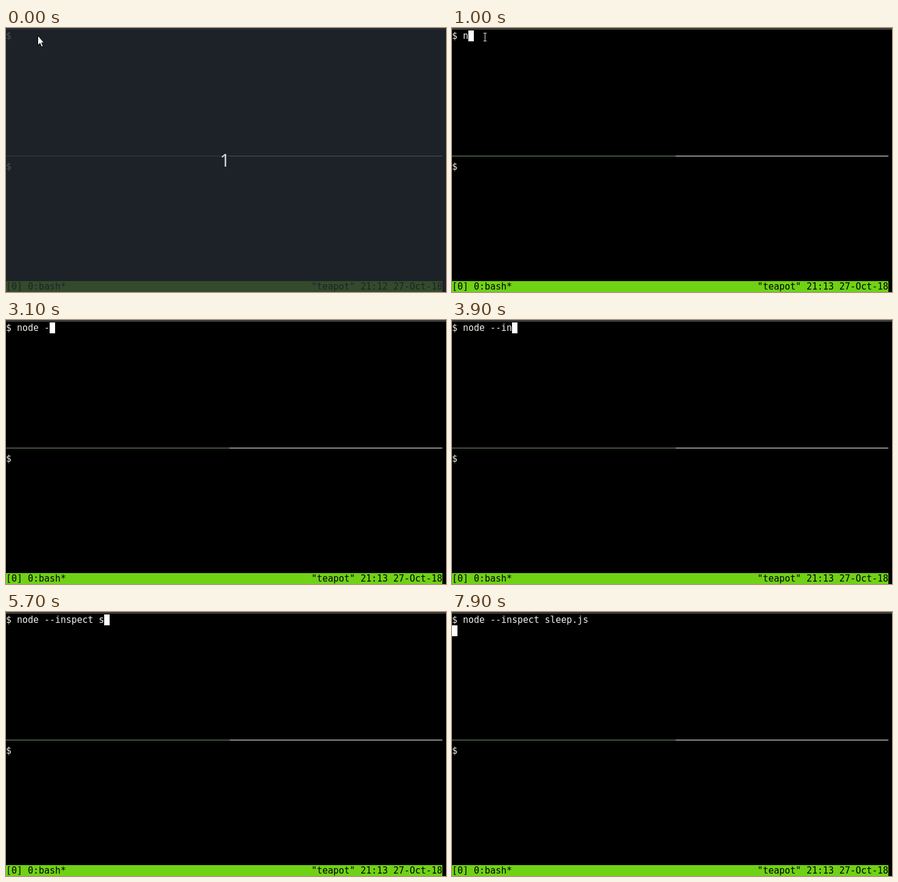
An HTML page that plays this animation: 726 by 436 pixels, repeating every 8 s.

```html
<!DOCTYPE html>
<html lang="en">
<head>
<meta charset="utf-8">
<title>Terminal session</title>
<style>
  html, body { margin: 0; width: 100%; height: 100%; overflow: hidden; background: #000; }
  #stage { position: relative; width: 726px; height: 436px; overflow: hidden; background: #000; }
  #stage > * { position: absolute; }
  .row {
    left: 0; height: 18px; white-space: pre; color: #eeeeec;
    font: 15px/18px "DejaVu Sans Mono", monospace; letter-spacing: -0.031px;
    font-variant-ligatures: none;
  }
  #top { left: 0; top: 0; width: 726px; height: 3px; background: #3c3b37; }
  .rule { top: 211px; height: 1px; }
  #bar { left: 0; top: 418px; width: 720px; height: 18px; background: #70d214; }
  .status { top: 418px; color: #000; }
  #caret { width: 9px; height: 18px; background: #fff; }
  #shade { inset: 0; background: rgba(37, 42, 50, .8); }
  #count {
    left: 353px; top: 197px; color: #d3d5d6;
    font: 29px/42px "Noto Sans", "Open Sans", sans-serif;
  }
</style>
</head>
<body>
<div id="stage">
  <div id="top"></div>
  <div class="row" id="prompt" style="top:4px">$ </div>
  <div id="caret"></div>
  <div class="rule" style="left:0;width:369px;background:#7a9a72"></div>
  <div class="rule" style="left:369px;width:351px;background:#fff"></div>
  <div class="row" style="top:220px">$ </div>
  <div id="bar"></div>
  <div class="row status">[0] 0:bash*</div>
  <div class="row status" id="clock" style="left:504px"></div>
  <svg id="beam" style="left:51px;top:8px" width="8" height="14" fill="none" stroke="#e4e4e4">
    <path d="M1 .5H6M3.5 .5V13.5M1 13.5H6"/>
  </svg>
  <div id="shade"></div>
  <div id="count">1</div>
  <svg id="arrow" style="left:51px;top:11px" width="14" height="23">
    <path d="M1.5 1.5V17.5L5.2 14.2L7.6 20.2L10.2 19.1L7.7 13.2H12Z" fill="#fff" stroke="#000"/>
  </svg>
</div>
<script>
  const LOOP = 8000, CELL = 9, LINE = 18, TOP = 4;
  const START = 100, CARET_ON = 300, CARET_OFF = 900, BEAM_OFF = 1100, ENTER = 7900;
  const command = "node --inspect sleep.js";
  // Time of each key press in ms
  const keys = [1000, 1300, 1700, 2200, 2600, 3100, 3400, 3700, 3900, 4300, 4500, 4700,
    4900, 5200, 5400, 5700, 6000, 6300, 6500, 6700, 7000, 7400, 7700];

  const el = id => document.getElementById(id);
  const show = (id, on) => { el(id).style.visibility = on ? "visible" : "hidden"; };
  const put = (id, text) => {
    if (el(id).textContent !== text) el(id).textContent = text;
  };

  function draw(t) {
    const typed = keys.filter(k => k <= t).length;
    const counting = t < START;
    const entered = t >= ENTER;

    put("prompt", "$ " + command.slice(0, typed));
    put("clock", `"teapot" 21:${counting ? 12 : 13} 27-Oct-18`);

    const caret = el("caret").style;
    caret.left = (entered ? 0 : (2 + typed) * CELL) + "px";
    caret.top = TOP + (entered ? LINE : 0) + "px";
    show("caret", typed > 0 || (t >= CARET_ON && t < CARET_OFF));

    for (const id of ["shade", "count", "arrow"]) show(id, counting);
    show("beam", !counting && t < BEAM_OFF);
  }

  const origin = performance.now();
  function tick() {
    draw((performance.now() - origin) % LOOP);
    requestAnimationFrame(tick);
  }
  tick();
</script>
</body>
</html>
```
